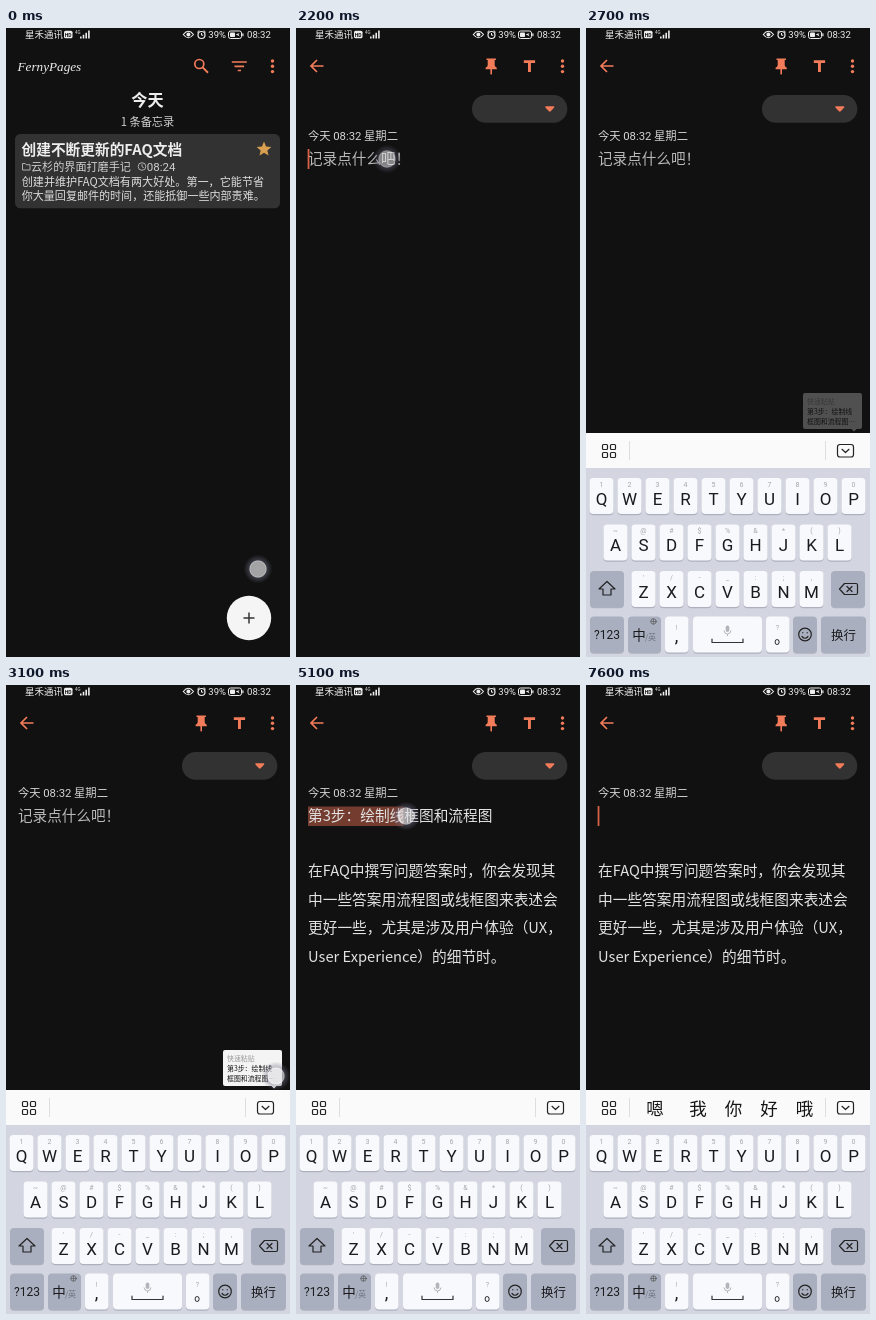
Recreate the animation shown at these times as an HTML page. Size 284 by 629 pixels, loop 8 s.

```html
<!DOCTYPE html>
<html lang="zh-CN">
<head>
<meta charset="utf-8">
<title>Notes</title>
<style>
html, body { margin: 0; width: 100%; height: 100%; overflow: hidden; background: #111; }
svg { display: block; width: 100%; height: 100%; }
text { font-family: "Noto Sans CJK SC", "Noto Sans CJK", "Noto Sans", sans-serif; font-weight: 500; fill: #ddd; white-space: pre; }
.num { font-family: Roboto, "Noto Sans CJK SC", sans-serif; font-weight: 400; }
.mid { text-anchor: middle; }
.b { font-weight: 700; }
.accent { fill: #f27c5a; }
.line { fill: none; stroke: #f27c5a; stroke-width: 1.7; }
.body { font-size: 14.7px; }
.body, .body text { fill: #e2e2e2; }
.ink { fill: none; stroke: #222; stroke-width: 1.2; stroke-linecap: round; stroke-linejoin: round; }
#keys text { fill: #1b1b1e; }
#keys .hint { fill: #a5a7ae; font-size: 7px; }

.anim { animation: 8s step-end infinite; }
#list { animation-name: list; }
#dot { animation-name: dot; }
#panel { animation-name: panel; }
#board { animation-name: board; }
#caret { animation-name: caret; }
#clip { animation-name: clip; }
#empty { animation-name: empty; }
#head { animation-name: head; }
#para { animation-name: para; }
#mark { animation-name: mark; transform-origin: 12px 0; }
#grips { animation-name: grips; }
#menu { animation-name: menu; }
#words { animation-name: words; }

@keyframes list { 0% { opacity: 1 } 16.25% { opacity: .5 } 17.5%, 100% { opacity: 0 } }
@keyframes dot {
  0% { transform: translate(252px, 541px); opacity: 1 }
  6.25% { opacity: .75 }
  7.5% { opacity: .5 }
  8.75% { opacity: .25 }
  10% { opacity: 0 }
  15% { transform: translate(249px, 592px); opacity: 1 }
  16.25% { opacity: .5 }
  17.5% { opacity: 0 }
  27.5% { transform: translate(91px, 131px); opacity: .8 }
  28.75% { opacity: .5 }
  30% { opacity: .25 }
  31.25% { opacity: 0 }
  37.5% { transform: translate(270px, 391px); opacity: .5 }
  38.75% { opacity: 1 }
  41.25% { opacity: .6 }
  42.5% { opacity: .3 }
  43.75% { opacity: 0 }
  53.75% { transform: translate(23px, 131px); opacity: 1 }
  61.25% { transform: translate(45px, 131px) }
  62.5% { transform: translate(76px, 131px) }
  63.75% { transform: translate(110px, 131px) }
  65% { transform: translate(147px, 131px) }
  66.25% { transform: translate(183px, 131px) }
  67.5% { transform: translate(213px, 131px); opacity: 1 }
  68.75% { transform: translate(235px, 131px); opacity: .8 }
  70% { transform: translate(241px, 131px); opacity: .4 }
  71.25%, 100% { transform: translate(241px, 131px); opacity: 0 }
}
@keyframes panel { 0% { opacity: 0 } 28.75%, 100% { opacity: 1 } }
@keyframes board {
  0% { transform: translateY(224px); opacity: 0 }
  28.75% { transform: translateY(96px); opacity: .55 }
  30% { transform: translateY(30px); opacity: .85 }
  31.25%, 100% { transform: none; opacity: 1 }
}
@keyframes caret {
  0% { transform: translate(11.7px, 121px); opacity: 0 }
  27.5% { opacity: 1 }
  33.75% { opacity: 0 }
  41.25% { transform: translate(206.5px, 261.5px); opacity: 1 }
  47.5% { opacity: 0 }
  53.75% { opacity: 1 }
  57.5% { opacity: 0 }
  92.5%, 100% { transform: translate(11.7px, 121px); opacity: 1 }
}
@keyframes clip {
  0% { opacity: 0 }
  33.75% { opacity: .28 }
  35% { opacity: .6 }
  36.25% { opacity: .85 }
  37.5% { opacity: 1 }
  41.25% { opacity: .6 }
  42.5% { opacity: .3 }
  43.75%, 100% { opacity: 0 }
}
@keyframes empty { 0% { opacity: 1 } 41.25%, 100% { opacity: 0 } }
@keyframes head { 0% { opacity: 0 } 41.25% { opacity: 1 } 92.5%, 100% { opacity: 0 } }
@keyframes para { 0% { opacity: 0 } 41.25%, 100% { opacity: 1 } }
@keyframes mark {
  0% { transform: scaleX(0) }
  61.25% { transform: scaleX(.2) }
  62.5% { transform: scaleX(.36) }
  63.75% { transform: scaleX(.52) }
  65% { transform: scaleX(.76) }
  66.25% { transform: scaleX(.92) }
  67.5% { transform: scaleX(1) }
  92.5%, 100% { transform: scaleX(0) }
}
@keyframes grips { 0% { opacity: 0 } 71.25% { opacity: 1 } 92.5%, 100% { opacity: 0 } }
@keyframes menu {
  0% { opacity: 0 }
  72.5% { opacity: .5 }
  73.75% { opacity: 1 }
  92.5% { opacity: .6 }
  93.75% { opacity: .25 }
  95%, 100% { opacity: 0 }
}
@keyframes words { 0% { opacity: 0 } 93.75%, 100% { opacity: 1 } }
</style>
</head>
<body>
<svg viewBox="0 0 284 629" preserveAspectRatio="none">
  <defs>
    <radialGradient id="glow">
      <stop offset="0" stop-color="#e0e0e4" stop-opacity=".72"/>
      <stop offset=".48" stop-color="#e0e0e4" stop-opacity=".7"/>
      <stop offset=".56" stop-color="#f2f2f4" stop-opacity=".75"/>
      <stop offset=".63" stop-color="#70708a" stop-opacity=".4"/>
      <stop offset=".8" stop-color="#70708a" stop-opacity=".22"/>
      <stop offset="1" stop-color="#70708a" stop-opacity="0"/>
    </radialGradient>
    <g id="more" class="accent">
      <circle cy="-5.3" r="1.7"/><circle r="1.7"/><circle cy="5.3" r="1.7"/>
    </g>
  </defs>
  <rect width="284" height="629" fill="#111"/>

  <!-- editor -->
  <g id="editor">
    <path class="line" d="M27.500 38H15.500M21 32L15 38l6 6"/>
    <path class="accent" d="M190.500 30.500h9.400v1.500h-1.200v5.200q.3 1.800 2.100 2.500v1.500h-4.800v4.700l-.8.800-.8-.8v-4.700h-4.800v-1.500q1.800-.7 2.100-2.500v-5.200h-1.200z"/>
    <path class="accent" d="M227.800 32.300h11.300v2.700h-4.200v8.900h-2.900v-8.900h-4.200z"/>
    <use href="#more" x="266.500" y="38.300"/>
    <rect x="176" y="67" width="95.300" height="27.700" rx="13.800" fill="#323232"/>
    <path class="accent" d="M250 78.200h7.600q1.200.5.4 1.600l-3.300 3.500q-.9.700-1.800 0l-3.300-3.500q-.8-1.100.4-1.600z"/>
    <text x="12" y="111.800" font-size="11.350" style="fill:#d4d4d4">今天 <tspan class="num">08:32</tspan> 星期二</text>
    <text id="empty" class="anim" x="12" y="136.300" font-size="14.600" style="fill:#b8b8b8">记录点什么吧！</text>
    <rect id="mark" class="anim" x="12" y="121.500" width="184" height="19.500" fill="#743c2f"/>
    <text id="head" class="anim body" x="12" y="136.300">第3步：绘制线框图和流程图</text>
    <g id="para" class="anim body">
      <text x="12" y="191">在FAQ中撰写问题答案时，你会发现其</text>
      <text x="12" y="219.500">中一些答案用流程图或线框图来表述会</text>
      <text x="12" y="248">更好一些，尤其是涉及用户体验（UX，</text>
      <text x="12" y="276.500">User Experience）的细节时。</text>
    </g>
    <g id="grips" class="anim" fill="#fb7e5e">
      <path d="M12 141v8.700a8.700 8.700 0 1 1-8.700-8.700z"/>
      <path d="M195.800 141v8.700a8.700 8.700 0 1 0 8.700-8.700z"/>
    </g>
    <rect id="caret" class="anim" width="1.500" height="20" fill="#f4714f"/>
    <g id="menu" class="anim">
      <rect x="12" y="86" width="233" height="28" rx="14" fill="#414141"/>
      <g id="acts" font-size="12.400"></g>
      <g fill="#eee"><circle cx="223.700" cy="95.300" r="1.500"/><circle cx="223.700" cy="100.200" r="1.500"/><circle cx="223.700" cy="105.100" r="1.500"/></g>
    </g>
    <g id="clip" class="anim">
      <path d="M219 365h55q2 0 2 2v32q0 2-2 2h-3.500l-2.500 2.500-2.500-2.500H219q-2 0-2-2v-32q0-2 2-2z" fill="#f4f4f4"/>
      <g font-size="6.900">
        <text x="221" y="376" style="fill:#999">快速粘贴</text>
        <text x="221" y="386" style="fill:#111">第3步：绘制线</text>
        <text x="221" y="395.500" style="fill:#111">框图和流程图…</text>
      </g>
    </g>
  </g>

  <!-- keyboard -->
  <rect id="panel" class="anim" y="405" width="284" height="224" fill="#4f4f4f"/>
  <g id="board" class="anim">
    <rect y="405" width="284" height="36" fill="#fafafb"/>
    <rect y="440" width="284" height="189" fill="#d3d6e0"/>
    <path d="M43.500 413v19M239.500 413v19" stroke="#dedee2"/>
    <g class="ink">
      <rect x="16.500" y="416.500" width="5" height="5" rx="1"/><rect x="24.500" y="416.500" width="5" height="5" rx="1"/>
      <rect x="16.500" y="424.500" width="5" height="5" rx="1"/><rect x="24.500" y="424.500" width="5" height="5" rx="1"/>
      <rect x="251.500" y="416.500" width="16" height="12.500" rx="2.500"/><path d="M256 421.300l3.500 3.200 3.500-3.200"/>
    </g>
    <g id="keys"></g>
    <g class="ink">
      <path d="M21 553.500l8 7.500h-4v6h-8v-6h-4z"/>
      <path d="M258.500 555.500h11.500q1.500 0 1.500 1.500v8q0 1.500-1.500 1.500h-11.500l-5-5.500zM261 558.500l5 5m0-5l-5 5"/>
      <circle cx="219" cy="606.500" r="6.300"/><path d="M216 608.500q3 3.500 6 0M216.800 604.500v.3M221.200 604.500v.3"/>
      <path d="M126 611v3.500h31V611" stroke="#333"/>
      <circle cx="67.500" cy="593.500" r="2.700" stroke="#555" stroke-width=".7"/>
      <path d="M64.800 593.500h5.400M67.500 590.800v5.400" stroke="#555" stroke-width=".6"/>
    </g>
    <rect x="139.700" y="597.500" width="3.600" height="6.500" rx="1.800" fill="#b3b5bd"/>
    <path d="M138 602.500q.5 3.500 3.500 3.500t3.500-3.500M141.500 606v2" fill="none" stroke="#b3b5bd"/>
    <g id="words" class="anim" font-size="17.500"></g>
  </g>

  <!-- note list -->
  <g id="list" class="anim">
    <rect width="284" height="629" fill="#111"/>
    <text x="11.500" y="43" font-size="13.200" style="font-family:'Liberation Serif',serif;font-style:italic;font-weight:400;fill:#eee">FernyPages</text>
    <circle class="line" cx="193.300" cy="36" r="4.500"/><path class="line" d="M196.700 39.400l5.300 5.300" style="stroke-width:2"/>
    <path class="line" d="M225.800 34h15M228.500 38.300h9.600M231.700 42.500h3.300"/>
    <use href="#more" x="266.500" y="38.300"/>
    <text class="mid b" x="141.500" y="77.700" font-size="16.200" style="fill:#eee">今天</text>
    <text class="mid" x="141.500" y="97.700" font-size="11.200" style="fill:#d0d0d0">1 条备忘录</text>
    <rect x="9" y="106" width="265" height="74.300" rx="5.500" fill="#323232"/>
    <text class="b" x="15.500" y="126.700" font-size="14.700" style="fill:#eee">创建不断更新的FAQ文档</text>
    <path id="star" fill="#d8a050"/>
    <g fill="none" stroke="#bbb" stroke-width=".9">
      <path d="M16.500 135.500h2.700l1 1.200h3.800v5.300h-7.500z"/>
      <circle cx="136" cy="138.500" r="3.800"/><path d="M136 136.200v2.500l1.800 1"/>
    </g>
    <text x="25" y="142.700" font-size="11.100" style="fill:#d0d0d0">云杉的界面打磨手记</text>
    <text class="num" x="140.800" y="142.700" font-size="11.500" style="fill:#d0d0d0">08:24</text>
    <text x="15.700" y="157.700" font-size="11.100">创建并维护FAQ文档有两大好处。第一，它能节省</text>
    <text x="15.700" y="172.300" font-size="11.050">你大量回复邮件的时间，还能抵御一些内部责难。</text>
    <circle cx="243" cy="590" r="22.200" fill="#f5f5f5"/>
    <path d="M237.500 590h11M243 584.500v11" stroke="#333" stroke-width="1.500"/>
  </g>

  <!-- status bar -->
  <g fill="#eee">
    <text x="19" y="10.200" font-size="9.500" style="fill:#eee">星禾通讯</text>
    <rect x="58" y="2.800" width="8.500" height="7.500" rx="1.500"/>
    <text class="mid num b" x="62.200" y="8.500" font-size="5" style="fill:#111">HD</text>
    <text class="num" x="69" y="6" font-size="4.500">4G</text>
    <path d="M74 8.500h1.600v2H74zM76.700 6.800h1.600v3.700h-1.600zM79.400 4.700H81v5.800h-1.600zM82.100 2.500h1.600v8h-1.600z"/>
    <path d="M177.300 6.500q5-6.500 10.200 0q-5.200 6.500-10.200 0z" fill="none" stroke="#eee" stroke-width="1.100"/>
    <circle cx="182.400" cy="6.500" r="2"/>
    <circle cx="195.500" cy="7" r="3.500" fill="none" stroke="#eee" stroke-width="1.200"/>
    <path d="M195.500 5v2.200h1.700M191.300 4.300l2-1.800M199.700 4.300l-2-1.800" fill="none" stroke="#eee"/>
    <text class="num" x="202.300" y="10.200" font-size="9.500" style="fill:#eee">39%</text>
    <rect x="222.500" y="3" width="13" height="7.500" rx="2" fill="none" stroke="#eee"/>
    <rect x="224" y="4.500" width="5" height="4.500" rx=".8"/><path d="M229.700 6.200l3.800-1-1 1.500 1.200 1.800z"/>
    <rect x="236.300" y="5.200" width="1.200" height="3" rx=".5"/>
    <text class="num" x="241" y="10.200" font-size="9.600" style="fill:#eee">08:32</text>
  </g>

  <g id="dot" class="anim"><circle r="14.500" fill="url(#glow)"/></g>
</svg>
<script>
const $ = id => document.getElementById(id);

function add(parent, tag, attrs, content) {
  const el = document.createElementNS('http://www.w3.org/2000/svg', tag);
  for (const name in attrs) el.setAttribute(name, attrs[name]);
  if (content) el.textContent = content;
  return parent.appendChild(el);
}

const label = (parent, x, y, content, size, cls = 'mid') =>
  add(parent, 'text', { x, y, class: cls, ...(size && { 'font-size': size }) }, content);

const keys = $('keys');
function key(x, y, w, fill = '#f8f9fc') {
  add(keys, 'rect', { x, y: y + 1.2, width: w, height: 36, rx: 4, fill: '#adb1bf' });
  add(keys, 'rect', { x, y, width: w, height: 36, rx: 4, fill });
}

const rows = [
  ['QWERTYUIOP', '1234567890', 15.5, 450],
  ['ASDFGHJKL', '~@#$%&*()', 29.5, 496.5],
  ['ZXCVBNM', "'/-_:;,", 57.5, 543]
];
for (const [letters, hints, left, y] of rows) {
  [...letters].forEach((c, i) => {
    const x = left + i * 28;
    key(x - 12, y, 24);
    label(keys, x, y + 8.5, hints[i], 0, 'mid num hint');
    label(keys, x, y + 26.7, c, 17, 'mid num');
  });
}

const grey = '#a9afbf';
key(4, 543, 34, grey);
key(245, 543, 34, grey);
key(4, 588.5, 34, grey);
key(42, 588.5, 33, grey);
key(79, 588.5, 23.5);
key(107, 588.5, 69);
key(180, 588.5, 23.5);
key(207, 588.5, 24, grey);
key(235, 588.5, 45, grey);
label(keys, 21, 611, '?123', 12, 'mid num');
label(keys, 53, 611.5, '中', 13.5);
label(keys, 64.5, 611.5, '/英', 8).style.fill = '#6f7480';
label(keys, 90.5, 602, '!', 9, 'mid num hint');
label(keys, 90.5, 614, ',', 18, 'mid num');
label(keys, 191.5, 602, '?', 9, 'mid num hint');
label(keys, 196, 615, '。', 16);
label(keys, 257.5, 611.5, '换行', 12.5);

[['嗯', 69], ['我', 112], ['你', 147.5], ['好', 183], ['哦', 218.5]].forEach(([c, x]) => {
  label($('words'), x, 429.5, c).style.fill = '#151515';
});

['剪切', '复制', '粘贴', '全选', '翻译'].forEach((c, i) => {
  label($('acts'), 36.7 + i * 38, 104.7, c).style.fill = '#eee';
});

const tips = Array.from({ length: 10 }, (_, i) => {
  const r = i % 2 ? 3.5 : 7.7, a = i * Math.PI / 5;
  return [258 + r * Math.sin(a), 121.3 - r * Math.cos(a)];
});
$('star').setAttribute('d', 'M' + tips.join('L') + 'Z');
</script>
</body>
</html>
```
